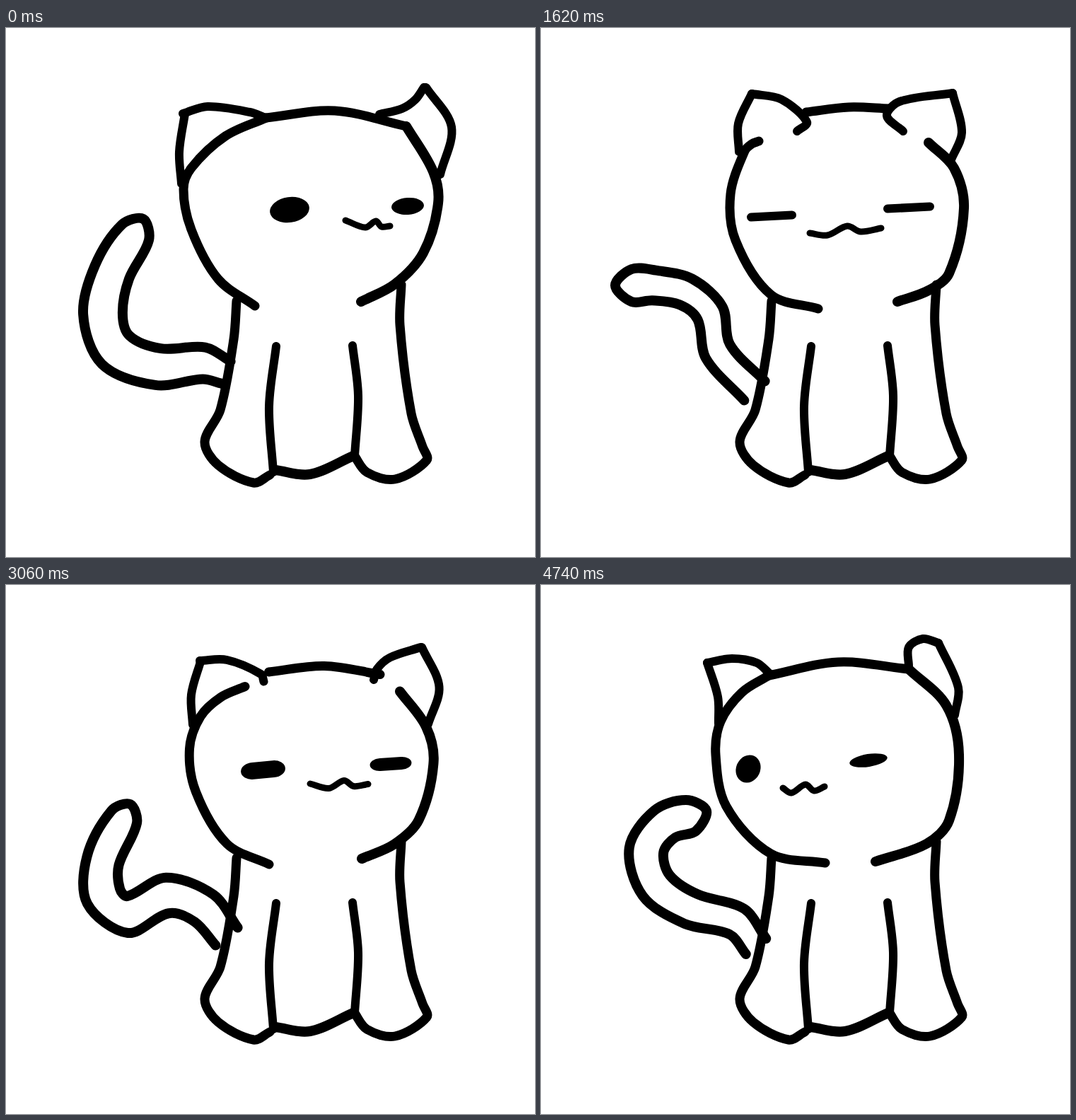
An HTML page for the animation above (4800 ms loop, 748 px wide and 748 px high).

```html
<!DOCTYPE html>
<html lang="en">
<head>
<meta charset="utf-8">
<title>Cat</title>
<style>
html, body { margin: 0; width: 100%; height: 100%; overflow: hidden; background: #fff; }
svg { display: block; width: 100vw; height: 100vh; }
path { fill: none; stroke: #000; stroke-linecap: round; stroke-linejoin: round; }
</style>
</head>
<body>
<svg id="stage" viewBox="0 0 748 748"></svg>
<script>
const STEP = 60, LOOP = 4800;
const stage = document.getElementById('stage');
const strokes = [], eyes = [], tails = [];

const add = name => stage.appendChild(document.createElementNS('http://www.w3.org/2000/svg', name));
const put = (el, attrs) => { for (const k in attrs) el.setAttribute(k, attrs[k]); };
const nums = s => s.split(/[ ,]+/).map(Number);
const points = s => s.split(' ').map(nums);
const mix = (a, b) => a.map((v, i) => (v + b[i]) / 2);
const gap = (a, b) => Math.hypot(b[0] - a[0], b[1] - a[1]);
const move = (p, dir, k) => [p[0] + dir[0] * k, p[1] + dir[1] * k];

// Smooth curve through points
function curve(pts) {
  const at = i => pts[Math.max(0, Math.min(pts.length - 1, i))];
  const handle = (i, side) => {
    const a = at(i - side), b = at(i), c = at(i + side);
    const d = gap(b, c), k = d / (gap(a, b) + d || 1) / 3;
    return move(b, [c[0] - a[0], c[1] - a[1]], k);
  };
  let d = 'M' + pts[0];
  for (let i = 0; i < pts.length - 1; i++) d += 'C' + [handle(i, 1), handle(i + 1, -1), at(i + 1)].join(' ');
  return d;
}

// Tube around a spine, its radius easing from base over middle to tip
function tube(base, mid, tip, spine) {
  const last = spine.length - 1, left = [], right = [];
  let dir;
  spine.forEach((p, i) => {
    const u = i / last;
    const r = base * (1 - u) * (1 - 2 * u) + 4 * mid * u * (1 - u) + tip * u * (2 * u - 1);
    const a = spine[Math.max(0, i - 1)], b = spine[Math.min(last, i + 1)], len = gap(a, b);
    dir = [(b[0] - a[0]) / len, (b[1] - a[1]) / len];
    const side = [-dir[1], dir[0]];
    left.push(move(p, side, r));
    right.unshift(move(p, side, -r));
  });
  return curve([...left, move(spine[last], dir, tip), ...right]);
}

const still = (width, pts) => put(add('path'), { d: curve(points(pts)), 'stroke-width': width });

// Key poses: looking right, facing front, looking left, with halfway poses between
const poses = (r, c, l) => [r, mix(r, c), c, mix(c, l), l];
const pairs = list => list.flatMap((v, i) => i % 2 ? [] : [[v, list[i + 1]]]);
function stroke(width, ...keys) {
  const el = add('path');
  put(el, { 'stroke-width': width });
  strokes.push({ el, shapes: poses(...keys.map(nums)).map(p => curve(pairs(p))) });
}
// Eye: centre, half size, corner radii, tilt
const eye = (...keys) => eyes.push({ el: add('rect'), shapes: poses(...keys.map(nums)) });

const tailPath = add('path');
put(tailPath, { 'stroke-width': 14 });
const tail = (base, mid, tip, spine) => tails.push(tube(base, mid, tip, points(spine)));
tail(17, 28, 22, '311,487 280,474 215,479 155,455 137,404 150,345 183,289');
tail(20, 26, 20, '312,497 280,457 228,439 172,466 138,440 137,390 167,328');
tail(18, 24, 18, '308,507 272,460 208,421 135,427 82,396 62,375');
tail(15, 26, 20, '304,515 276,455 238,408 190,400 135,417 103,441');
tail(13, 27, 24, '302,525 270,465 236,406 200,399 157,421 153,451');
tail(20, 20, 23, '302,513 250,457 239,403 205,373 160,364 128,364');
tail(26, 27, 16, '304,512 240,487 190,452 180,385 177,345 161,322');
tail(18, 24, 23, '304,511 277,476 212,458 163,425 149,375 175,338 212,326');

// Body
still(13, '326,386 322,440 303,540 281,585 300,618 350,643 373,632');
still(12, '382,450 372,535 378,628');
still(14, '381,625 430,631 491,605');
still(12, '490,449 498,520 493,605');
still(13, '559,363 557,420 573,545 589,592 595,611 550,638 510,628 492,604');

// Head: left side, crown, right side
stroke(13,
  '352,393 300,355 262,285 251,228 262,198 310,153 368,127',
  '392,397 325,377 275,300 268,235 288,174 298,164 308,160',
  '402,393 325,380 262,313 247,240 254,193 284,152 322,128');
stroke(13, '368,127 465,117 566,139', '375,119 435,112 492,114', '322,128 420,109 520,119');
stroke(14,
  '566,139 604,203 611,248 590,318 550,362 502,387',
  '548,162 584,198 598,255 577,347 548,371 504,387',
  '520,119 573,170 591,240 577,333 545,366 473,391');

// Ears: outer and upper edge of the left, inner and outer edge of the right
stroke(12, '248,220 245,175 253,121', '280,175 279,135 298,93', '251,196 250,158 235,110');
stroke(12,
  '250,121 285,111 345,119 367,127',
  '298,93 340,101 376,133 362,146',
  '235,110 270,104 305,110 323,125');
stroke(12,
  '528,122 560,114 579,101 591,84',
  '512,146 489,124 507,104 582,92',
  '520,115 520,88 540,76 562,82');
stroke(12, '594,84 630,140 614,207', '582,92 595,148 580,186', '562,82 590,145 585,184');

// Face
stroke(9,
  '480,272 508,282 523,273 531,281 543,280',
  '380,290 405,293 433,280 452,288 481,283',
  '342,287 354,294 374,282 386,291 401,285');
eye('401,257,28,18,28,18,-8', '326,266,35,6,6,6,-3', '293,260,17,20,17,20,25');
eye('568,252,23,12,23,12,-4', '520,254,36,6,6,6,-3', '463,248,27,9,27,9,-9');

function draw(time) {
  const tick = Math.floor(time % LOOP / STEP), pose = tick % 5;
  put(tailPath, { d: tails[(tick >> 1) % tails.length] });
  for (const s of strokes) put(s.el, { d: s.shapes[pose] });
  for (const e of eyes) {
    const [x, y, a, b, rx, ry, turn] = e.shapes[pose];
    put(e.el, { x: x - a, y: y - b, width: 2 * a, height: 2 * b, rx, ry, transform: `rotate(${turn} ${x} ${y})` });
  }
}
function loop() {
  draw(performance.now());
  requestAnimationFrame(loop);
}
loop();
</script>
</body>
</html>
```
